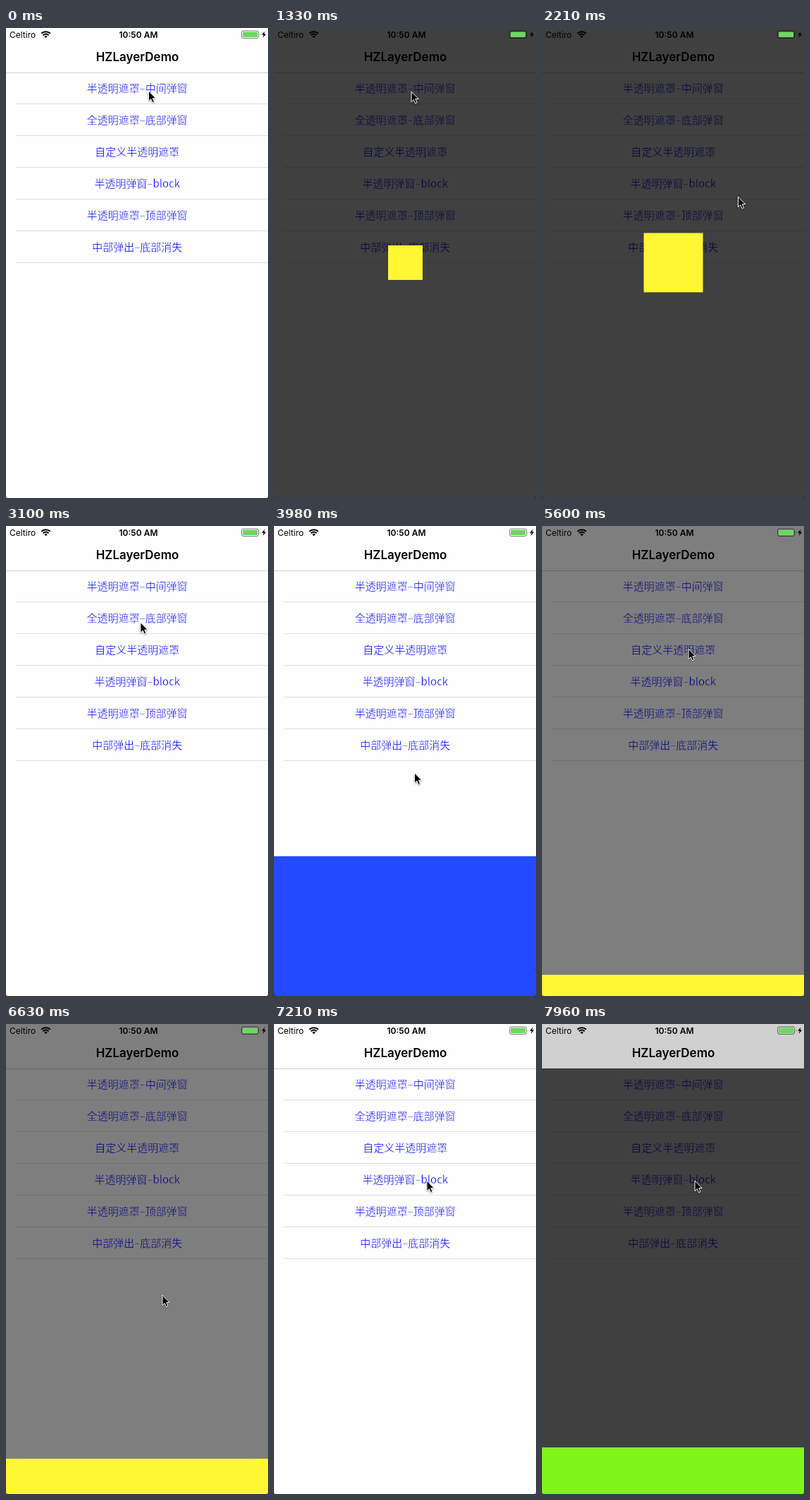
Recreate the animation shown at these times as an HTML page. Size 372 by 666 pixels, loop 8000 ms.

```html
<!DOCTYPE html>
<html lang="zh-CN">
<head>
<meta charset="utf-8">
<style>
  html, body { margin: 0; width: 100%; height: 100%; overflow: hidden; background: #fefefe; }
  svg { display: block; width: 372px; height: 666px; }
  text { font-family: Inter, "Liberation Sans", sans-serif; }
  /* the page-coloured outline thins the strokes to a light weight */
  .row { font: 300 15px "Noto Sans CJK SC", "Noto Sans CJK", sans-serif; fill: #00f;
    stroke: #fefefe; stroke-width: .35px; text-anchor: middle; }
  .bold { font-weight: 600; text-anchor: middle; }
</style>
</head>
<body>
<svg viewBox="0 0 372 666">
  <rect width="372" height="666" fill="#fefefe"/>
  <g id="rows"></g>
  <g id="nav">
    <rect id="bar" width="372" height="63"/>
    <rect y="63" width="372" height="1" fill="#000" opacity=".18"/>
    <text class="bold" x="186.5" y="47" font-size="17">HZLayerDemo</text>
  </g>
  <rect id="mask" width="372" height="666"/>
  <rect id="popup"/>
  <g id="status">
    <text x="5" y="13.5" font-size="12">Celtiro</text>
    <g fill="none" stroke="#000" stroke-width="2">
      <path d="M50.2 7.8a9 9 0 0 1 12.6 0M52.5 10.2a5.7 5.7 0 0 1 8 0"/>
    </g>
    <path d="M54.3 11.9a3.1 3.1 0 0 1 4.4 0L56.5 14.2Z"/>
    <text class="bold" x="188" y="13.5" font-size="12">10:50 AM</text>
    <rect x="334.5" y="4" width="24" height="10.5" rx="2.5" fill="none" stroke="#000" stroke-opacity=".5"/>
    <rect x="336" y="5.5" width="21" height="7.5" rx="1" fill="#6bd85f"/>
    <path d="M360 7.5q1.6 1.7 0 3.5z" opacity=".5"/>
    <path d="M367.6 4.5L363 9.8h2.8L364.6 14l4.6-5.6h-2.8z"/>
  </g>
  <path d="M0 664v2h2zM372 664v2h-2z" opacity=".5"/>
  <path id="cursor" d="M0 0V14.5L3.3 11.4 5.6 16.6 8 15.5 5.8 10.4H10.2Z" stroke="#fff"
    style="filter: drop-shadow(0 1px 1px #0006)"/>
</svg>
<script>
const $ = id => document.getElementById(id);
const set = (el, attrs) => { for (const k in attrs) el.setAttribute(k, attrs[k]); };

const W = 372, H = 666, LOOP = 8000, ANIM = 250;
const labels = ['半透明遮罩–中间弹窗', '全透明遮罩–底部弹窗', '自定义半透明遮罩',
  '半透明弹窗–block', '半透明遮罩–顶部弹窗', '中部弹出–底部消失'];
$('rows').innerHTML = labels.map((label, i) =>
  `<text class="row" x="186.3" y="${91 + i * 45}">${label}</text>
   <rect x="14" y="${107 + i * 45}" width="358" height="1" fill="#dfdfdf"/>`).join('');

const popups = [
  { open: 1231, close: 2095, fill: '#fff733', dim: .75, size: 149, center: true },
  { open: 3330, close: 4648, fill: '#244aff', dim: 0, size: 198 },
  { open: 5528, close: 6451, fill: '#fff733', dim: .5, size: 198 },
  { open: 7845, close: 9000, fill: '#7ff51a', dim: .75, size: 198, navOnTop: true }
];

// time, x, y of the pointer tip
const path = [
  [300, 203, 90], [1190, 195.5, 91], [1327, 195.5, 91], [1900, 279, 240], [2503, 279, 240],
  [3091, 191.5, 137.5], [3400, 191.5, 137.5], [4120, 201, 376.5], [4860, 201, 376.5],
  [5443, 208.5, 175], [5737, 208.5, 175], [6472, 222.5, 385], [6625, 222.5, 385],
  [6913, 222.5, 256], [7207, 217.5, 223]
];

const ease = t => { t = Math.min(1, Math.max(0, t)); return t * t * (3 - 2 * t); };

function pointerAt(t) {
  const i = path.findIndex(p => p[0] > t);
  if (i === 0) return path[0].slice(1);
  if (i < 0) return path[path.length - 1].slice(1);
  const [t0, x0, y0] = path[i - 1], [t1, x1, y1] = path[i];
  const k = ease((t - t0) / (t1 - t0));
  return [x0 + (x1 - x0) * k, y0 + (y1 - y0) * k];
}

function draw(t) {
  const p = popups.find(p => t > p.open && t < p.close + ANIM);
  const shown = p ? ease((t - p.open) / ANIM) - ease((t - p.close) / ANIM) : 0;
  const size = p ? Math.round(p.size * shown) : 0;
  const box = p && p.center
    ? { x: 186.5 - size / 2, y: 332.5 - size / 2, width: size }
    : { x: 0, y: H - size, width: W };
  set($('popup'), { ...box, height: size, fill: p ? p.fill : 'none' });
  set($('mask'), { opacity: p ? p.dim : 0, y: p && p.navOnTop ? 63 : 0 });
  set($('bar'), { fill: p && p.navOnTop ? '#d0d0d0' : '#fefefe' });
  const [x, y] = pointerAt(t);
  set($('cursor'), { transform: `translate(${x - .5} ${y - .8})` });
}

function frame(now) {
  const t = now % LOOP;
  draw(445 + 147 * Math.floor((t - 445) / 147));
  requestAnimationFrame(frame);
}
requestAnimationFrame(frame);
</script>
</body>
</html>
```
